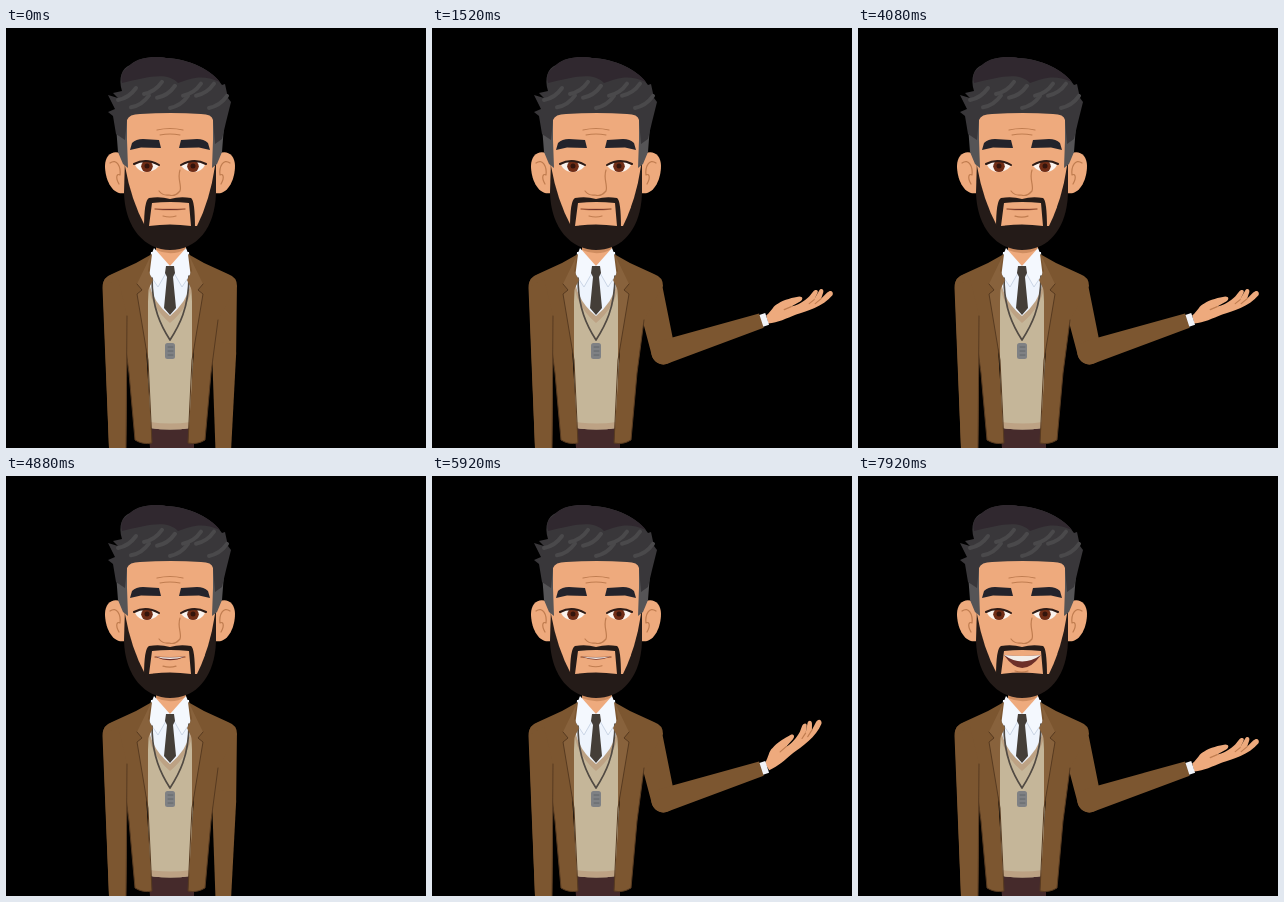
These frames come from a looping animation (420x420 px, 8 s). An HTML page:

```html
<!DOCTYPE html>
<html lang="en">
<head>
<meta charset="utf-8">
<title>Presenter</title>
<style>
  html, body { margin: 0; width: 100%; height: 100%; overflow: hidden; background: #000; }
  svg { display: block; width: 100%; height: 100%; }
  .line { fill: none; stroke-linecap: round; stroke-linejoin: round; }
  .skin { fill: #eeaa7d; }
  .jacket { fill: #7c5630; }
  .beard { fill: #241b18; }
  .seam { stroke: #573a20; }
  .crease { stroke: #c07d50; stroke-width: 1.2; }
  .strand { stroke: #4a494b; stroke-width: 4; }
  .mirror { transform: translate(328px, 0) scale(-1, 1); }
</style>
</head>
<body>
<svg viewBox="0 0 420 420">
  <!-- raised arm -->
  <g id="upper">
    <path class="jacket" d="M-4-14L64-12A12 12 0 0 1 64 12L0 14Z"/>
    <g id="fore">
      <g id="hand">
        <path class="skin" d="M2-4C8-9 9-14 14-16C20-20 29-22 35-23C39-23 39-20 36-18L27-13C33-14 40-18 45-23L49-28C52-31 55-29 53-26L50-20L55-29C57-32 60-30 59-27L57-21L63-27C67-31 70-27 68-24C59-13 42-8 32-5C22-1 14 3 4 4Z"/>
        <path class="line crease" d="M27-13L20-10M50-20L45-16M57-21L51-16"/>
      </g>
      <path fill="#f1f3f8" d="M102-6H109V6.5H102Z"/>
      <path class="jacket" d="M0-12L103-7.5V7.5L0 12A12 12 0 0 1 0-12Z"/>
    </g>
  </g>

  <!-- body -->
  <path fill="#452a2b" d="M142 398H188V420H144Z"/>
  <path fill="#c5b699" d="M139 250H189L185 400Q164 403 144 400Z"/>
  <path fill="#bda284" d="M144 394Q164 397 185 394V400Q164 403 144 400ZM142 258Q146 280 164 295Q182 280 187 258Z"/>
  <path fill="#eef4fd" d="M145 224H183L185 255Q181 274 164 288Q147 274 143 255Z"/>
  <path class="skin" d="M150 210H180V223L164 239L150 224Z"/>
  <path fill="#cf8d60" d="M150 214Q166 227 180 214V221Q166 229 150 222Z"/>
  <g id="collar">
    <path fill="#f4f8fe" d="M148 220L164 238L152 259L140 240Z"/>
    <path class="line" stroke="#cbd6e6" d="M142 244L152 259L164 238"/>
  </g>
  <use href="#collar" class="mirror"/>
  <path fill="#443e38" d="M160 238H168L169 245L167 249L170 280L164 287L158 280L161 249L159 245Z"/>
  <path class="line" stroke="#514a43" stroke-width="1.7" d="M146 250C146 280 155 298 164 312C173 298 183 280 183 248"/>
  <rect x="159" y="315" width="10" height="16" rx="2.5" fill="#7f8184"/>
  <path class="line" stroke="#63676a" d="M162 319H167M162 323H167M162 327H167"/>

  <path class="jacket" d="M108 246Q96 249 96.5 260L103 420H120L122 280Z"/>
  <g id="panel">
    <path class="jacket" d="M146 226L130 235L106 246Q97 249 97 258L116 292L123 345L129 412Q137 417 146 415L140 320L143 250Z"/>
    <path fill="#88623c" d="M145 227L131 256L136 262L131 266L142 332L142 262L147 252L142 243Z"/>
    <path class="line seam" d="M116 292L123 345L129 412Q137 417 146 415L142 332L131 266L136 262L131 256"/>
  </g>
  <use href="#panel" class="mirror"/>
  <path class="jacket" d="M97 259L103 420H120L121 288L112 250Z"/>
  <path class="line seam" d="M121 288L120 420"/>

  <!-- head -->
  <g id="ear">
    <path class="skin" d="M120 129C111 120 99 124 99 138C99 151 106 168 119 165Z"/>
    <path class="line crease" d="M104 135C111 130 115 139 114 147C111 145 109 149 113 156"/>
  </g>
  <use href="#ear" class="mirror"/>
  <path class="beard" d="M119 130L118 165C119 200 139 222 164 222C191 222 209 200 210 165L210 130Z"/>
  <path class="skin" d="M119 80H210L209 138Q204 172 191 198H139Q125 172 119 138Z"/>
  <path class="beard" d="M143 170Q154 168 164 171Q174 168 185 170Q189 172 189 201H138Q138 172 143 170Z"/>
  <path class="skin" d="M146 175Q164 173 183 175L185 198Q164 195 143 198Z"/>
  <g id="sideburn">
    <path fill="#555456" d="M109 85H121V112L122 140L117 136L112 124Z"/>
  </g>
  <use href="#sideburn" class="mirror"/>
  <path fill="#39373a" d="M121 92L119 112L110 106L107 88L102 84L109 81L102 67L112 70L107 65L116 63C112 50 116 40 124 37C133 29 150 28 160 30C184 31 206 42 216 57L219 56L222 70L225 74L220 94L216 111L209 116L207 92Q206 86 195 86Q165 84 134 86Q123 86 121 92Z"/>
  <g id="strands"></g>
  <path fill="#30282f" d="M116 55C113 43 121 41 124 37C133 29 150 28 160 30C182 31 204 41 214 54C196 46 186 50 172 55C160 43 140 50 116 55Z"/>

  <path class="line crease" d="M151 102Q164 99 177 102M154 107Q164 105 174 107M174 142C171 151 176 157 174 163Q169 169 163 167Q157 168 153 163"/>
  <g id="eye">
    <path fill="#23232b" d="M124 122L126 115Q130 111 137 111L153 112L155 120L135 119.5Z"/>
    <path fill="#faf3ee" d="M129 137Q140 129 153 138Q148 144 139 144Q132 143 129 137Z"/>
    <circle cx="141" cy="138.3" r="5.8" fill="#702d16"/>
    <circle cx="141" cy="138" r="2.5" fill="#33140c"/>
    <path class="line" stroke="#2b1a16" stroke-width="2" d="M128 136Q140 129.500 153 137"/>
  </g>
  <use href="#eye" class="mirror"/>
  <path id="lips" class="line" stroke="#a8623f" stroke-width="1.3"/>
  <path id="mouth" fill="#6d3029"/>
  <path id="teeth" fill="#f2eeea"/>
  <path id="chin" class="line crease"/>
</svg>
<script>
  const LOOP = 8000;
  const el = id => document.getElementById(id);
  const mix = (a, b, u) => a + (b - a) * u;

  // Eased 0..1 between two times.
  function ramp(time, from, to) {
    const u = Math.min(1, Math.max(0, (time - from) / (to - from)));
    return u * u * (3 - 2 * u);
  }

  const place = (id, x, y, angle) =>
    el(id).setAttribute('transform', `translate(${x} ${y}) rotate(${angle})`);
  const trace = (id, d) => el(id).setAttribute('d', d);

  function drawHair() {
    for (let i = 0; i < 8; i++) {
      const x = 112 + 13 * i, y = 72 + 8 * Math.sin(i * 2);
      el('strands').insertAdjacentHTML('beforeend',
        `<path class="line strand" d="M${x} ${y}q11 -2 18 -12"/>`);
    }
  }

  function drawArm(time) {
    const rises = [160, 5120];
    const lift = rises.reduce((sum, t) => sum + ramp(time, t, t + 800), -ramp(time, 4160, 4800));
    const flick = rises.reduce((sum, t) =>
      sum + ramp(time, t, t + 800) - ramp(time, t + 800, t + 1120), 0);
    const upper = mix(89, 77, Math.min(1, 2 * lift));
    const fore = mix(90.5, -18, lift);
    place('upper', 217, 262, upper);
    place('fore', 64, 0, fore - upper);
    place('hand', 106, 0, 18 + mix(58, 0, lift) - 18 * flick);
  }

  function drawMouth(time) {
    const pause = ramp(time, 2720, 2960) - ramp(time, 3240, 3400);
    const talk = .35 * (1 - pause) * Math.sin(Math.PI * time / 507) ** 2;
    const open = mix(talk, 1, ramp(time, 7560, 7900));
    const left = 151 - 5 * open, right = 177 + 6 * open, top = 181 - 2 * open;
    const upper = `M${left} ${top}Q164 ${top + 2} ${right} ${top}`;
    trace('lips', `M149 181Q164 ${182 + open} 179 181`);
    trace('mouth', `${upper}Q164 ${181 + 24 * open} ${left} ${top}Z`);
    trace('teeth', `${upper}Q164 ${top + 2 + 11 * open} ${left} ${top}Z`);
    trace('chin', `M157 ${188 + 7 * open}q7 2 13 0`);
  }

  const start = performance.now();
  function tick() {
    const time = (performance.now() - start) % LOOP;
    drawArm(time);
    drawMouth(time);
    requestAnimationFrame(tick);
  }
  drawHair();
  tick();
</script>
</body>
</html>
```
